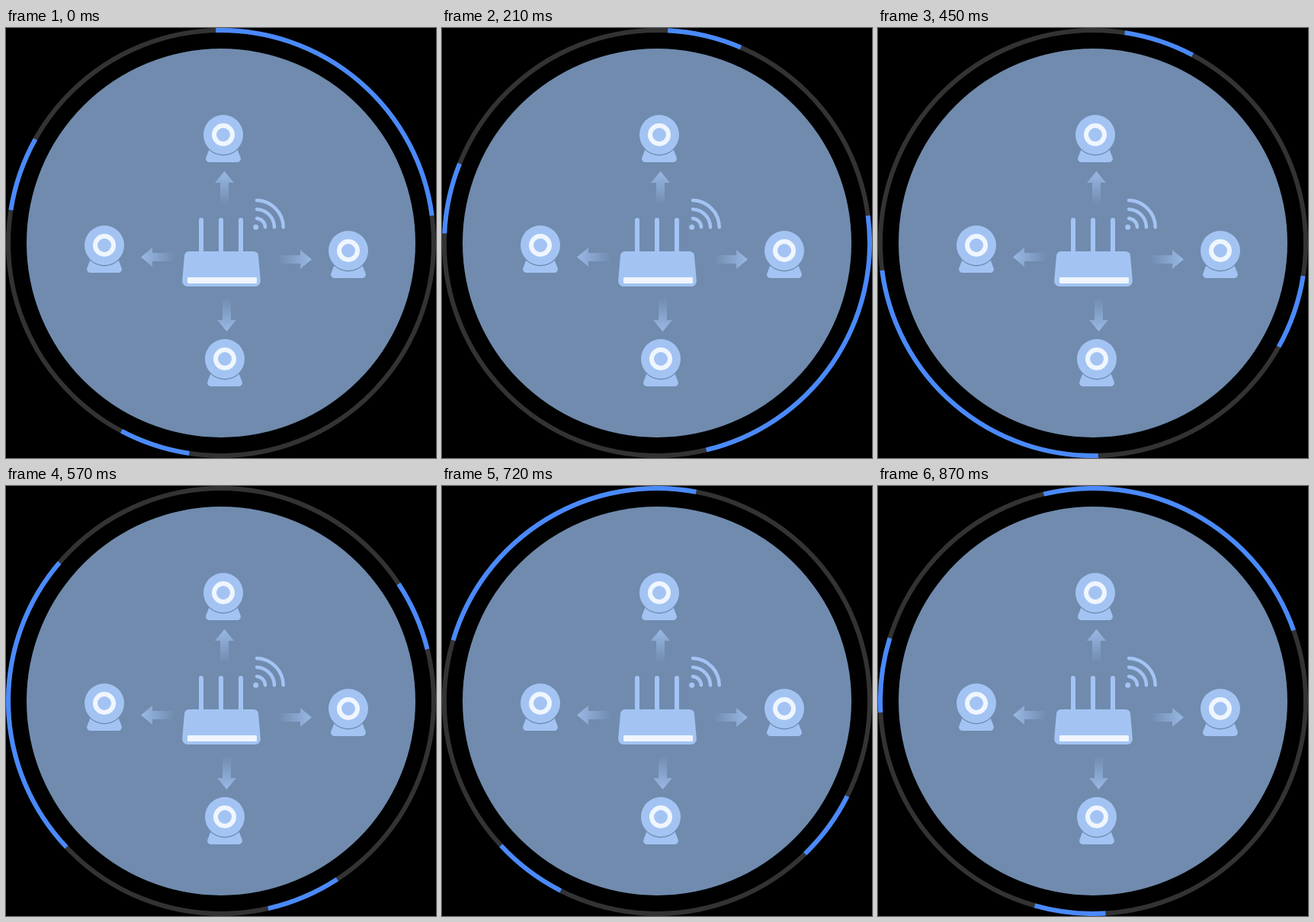
These frames come from a looping animation (564 px wide and 564 px high, 900 ms). An HTML page with a canvas:

```html
<!DOCTYPE html>
<html lang="en">
<head>
<meta charset="utf-8">
<title>Router and cameras</title>
<style>
  html, body { margin: 0; width: 100%; height: 100%; overflow: hidden; background: #000; }
  canvas { display: block; width: 564px; height: 564px; }
</style>
</head>
<body>
<canvas id="stage" width="564" height="564"></canvas>
<script>
const ctx = document.getElementById('stage').getContext('2d');
const SIZE = 564, CENTER = 282;
const LOOP = 900, STEP = 30;
const DISC = '#708bae', PALE = '#a3c4f3', WHITE = '#f0f6ff';
const TRACK = '#333333', ACCENT = '#4a8aff';

// Accent arcs as [start, end], in degrees clockwise from the top
const ARCS = [[-1.4, 82.6], [188.6, 207.9], [278.9, 299.2]];

function disc(x, y, r, color) {
  ctx.fillStyle = color;
  ctx.beginPath();
  ctx.arc(x, y, r, 0, Math.PI * 2);
  ctx.fill();
}

function arc(x, y, r, from, to, width, color) {
  const rad = deg => (deg - 90) * Math.PI / 180;
  ctx.strokeStyle = color;
  ctx.lineWidth = width;
  ctx.beginPath();
  ctx.arc(x, y, r, rad(from), rad(to));
  ctx.stroke();
}

// Symmetric trapezoid with rounded corners
function trapezoid(x, top, bottom, halfTop, halfBottom, rTop, rBottom) {
  ctx.fillStyle = PALE;
  ctx.beginPath();
  ctx.moveTo(x, top);
  ctx.arcTo(x + halfTop, top, x + halfBottom, bottom, rTop);
  ctx.arcTo(x + halfBottom, bottom, x, bottom, rBottom);
  ctx.arcTo(x - halfBottom, bottom, x - halfTop, top, rBottom);
  ctx.arcTo(x - halfTop, top, x, top, rTop);
  ctx.closePath();
  ctx.fill();
}

function camera(x, y) {
  trapezoid(x, y + 18, y + 36, 18, 25, 0, 4.5);
  disc(x, y, 27.4, DISC);
  disc(x, y, 26, PALE);
  arc(x, y, 12, 0, 360, 6, WHITE);
}

// Arrow with its tip at x, y, turned clockwise from pointing up
function arrow(x, y, degrees) {
  ctx.save();
  ctx.translate(x, y);
  ctx.rotate(degrees * Math.PI / 180);
  const fade = ctx.createLinearGradient(0, 0, 0, 44);
  fade.addColorStop(0, 'rgba(163,196,243,.8)');
  fade.addColorStop(1, 'rgba(163,196,243,0)');
  ctx.fillStyle = fade;
  ctx.beginPath();
  ctx.moveTo(0, 0);
  ctx.lineTo(12.5, 15);
  ctx.lineTo(5.5, 15);
  ctx.lineTo(5.5, 44);
  ctx.lineTo(-5.5, 44);
  ctx.lineTo(-5.5, 15);
  ctx.lineTo(-12.5, 15);
  ctx.fill();
  ctx.restore();
}

function roundBox(x, y, w, h, r, color) {
  ctx.fillStyle = color;
  ctx.beginPath();
  ctx.roundRect(x, y, w, h, r);
  ctx.fill();
}

function router() {
  for (const x of [253, 279, 305]) roundBox(x, 249, 6, 46, [3, 3, 0, 0], PALE);
  trapezoid(282.5, 293, 339, 48, 52, 6, 7);
  roundBox(238, 327, 91, 8, 1.5, WHITE);
}

function signal() {
  disc(327.7, 261.3, 3.5, PALE);
  ctx.lineCap = 'round';
  for (const r of [12, 24, 35.7]) arc(328, 261.7, r, 60 / r, 90 - 30 / r, 4.5, PALE);
  ctx.lineCap = 'butt';
}

function draw(time) {
  const turn = Math.floor(time % LOOP / STEP) * STEP / LOOP * 360;
  ctx.clearRect(0, 0, SIZE, SIZE);
  arc(CENTER, CENTER, 279, 0, 360, 6, TRACK);
  for (const [from, to] of ARCS) arc(CENTER, CENTER, 279, from + turn, to + turn, 6, ACCENT);

  disc(CENTER, CENTER, 255, DISC);
  camera(285, 140);
  camera(129, 285);
  camera(449, 292);
  camera(287, 434);
  arrow(286.5, 188, 0);
  arrow(401, 303.5, 90);
  arrow(289.5, 398, 180);
  arrow(177, 300.5, 270);
  router();
  signal();
}

const start = performance.now();
function tick() {
  draw(performance.now() - start);
  requestAnimationFrame(tick);
}
tick();
</script>
</body>
</html>
```
